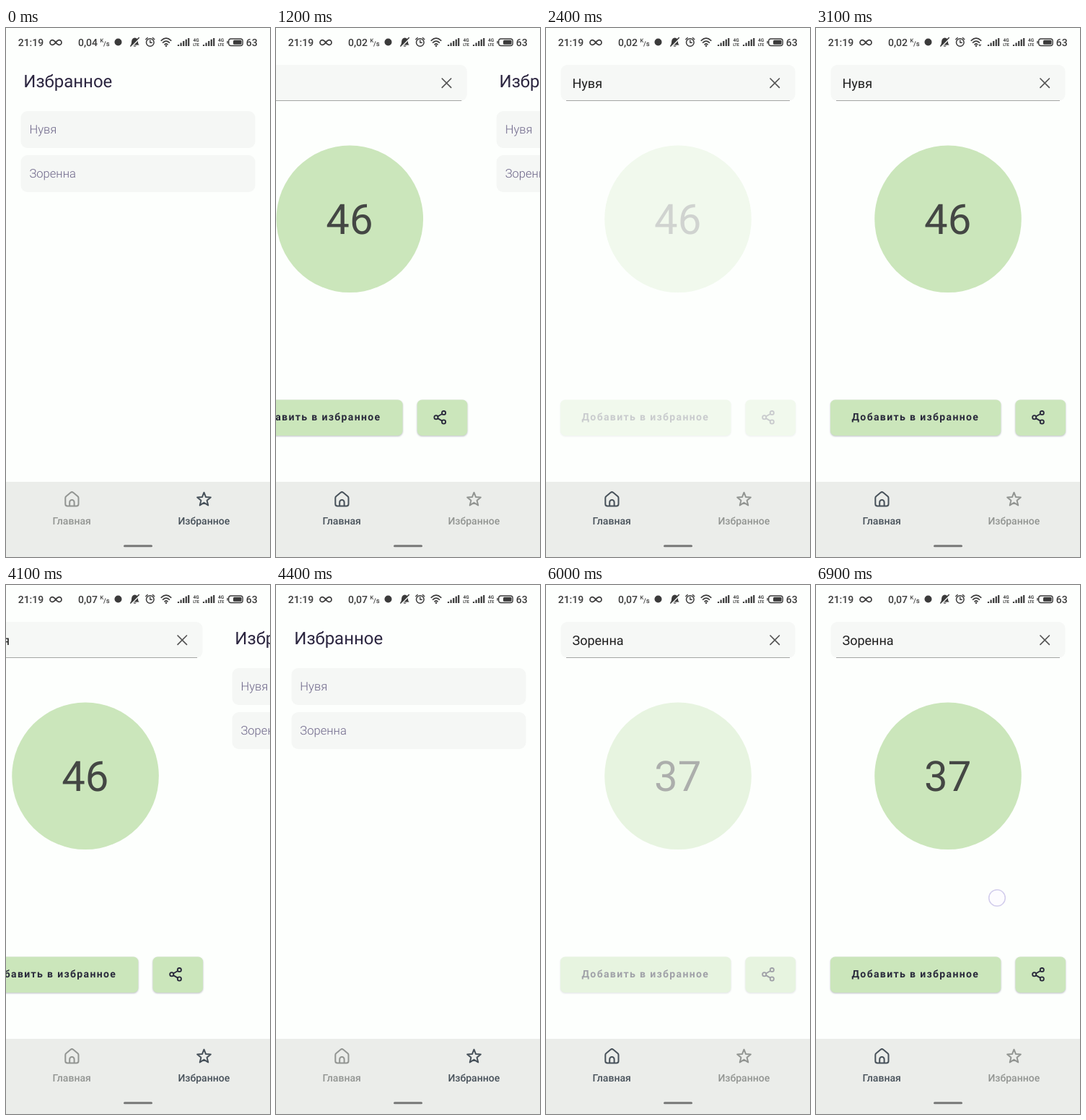
Recreate the animation shown at these times as an HTML page. Size 366 by 732 pixels, loop 7000 ms.

```html
<!DOCTYPE html>
<html lang="ru">
<head>
<meta charset="utf-8">
<title>Избранное</title>
<style>
  html, body { margin: 0; width: 100%; height: 100%; overflow: hidden; background: #fdfffd; }
  svg { display: block; width: 100vw; height: 100vh; font-family: Roboto, sans-serif; text-rendering: geometricPrecision; }
  .line { fill: none; stroke-linecap: round; stroke-linejoin: round; }
  .status { fill: #3b3b3b; font-size: 14px; font-weight: 500; }
  .status .line { fill: none; stroke: #3b3b3b; }
  .title { font-size: 24px; fill: #2c2640; }
  .item { font-size: 16.6px; font-weight: 300; fill: #6d6689; }
  .button { fill: #cbe6bb; filter: drop-shadow(0 1.3px 1px rgba(40, 40, 70, .3)); }
  .tab { fill: #929592; stroke: #929592; font-size: 14px; font-weight: 500; text-anchor: middle; }
  .tab text { stroke: none; }
  .tab .line { fill: none; stroke-width: 2; }
  .tab.on { fill: #47515a; stroke: #47515a; }
</style>
</head>
<body>
<svg viewBox="0 0 366 732">
  <defs>
    <g id="bars">
      <path d="M1 25v-2M4.6 25v-4.5M8.2 25v-7M11.8 25v-9.3M15.2 25v-11" stroke="#3b3b3b" stroke-width="2.2"/>
    </g>
    <g id="lte" font-size="6.4" font-weight="700" text-anchor="middle">
      <text y="18.6">4G</text>
      <text y="25" font-size="5.4">LTE</text>
    </g>
  </defs>
  <rect width="366" height="732" fill="#fdfffd"/>

  <g id="favourites">
    <text class="title" x="24.3" y="82">Избранное</text>
    <rect x="20.5" y="115" width="325" height="51" rx="9" fill="#f5f7f5"/>
    <rect x="20.5" y="176" width="325" height="51" rx="9" fill="#f5f7f5"/>
    <text class="item" x="32.4" y="146">Нувя</text>
    <text class="item" x="32.4" y="207">Зоренна</text>
  </g>

  <g id="home">
    <rect x="20.5" y="51" width="325" height="50" rx="9" fill="#f6f8f6"/>
    <path d="M28 100.5H338" stroke="#a5a6a5"/>
    <text id="name" x="36.5" y="82.5" font-size="18" fill="#1e1e1e"></text>
    <path class="line" d="M311 70l12.4 12.4M323.4 70L311 82.4" stroke="#555" stroke-width="1.7"/>
    <g id="result">
      <circle cx="183" cy="264.3" r="101.8" fill="#cbe6bb"/>
      <text id="score" x="182.7" y="284.5" font-size="58" fill="#444744" text-anchor="middle"></text>
      <rect class="button" x="20" y="514.5" width="236.3" height="49.5" rx="6.5"/>
      <rect class="button" x="276.5" y="514.5" width="69.5" height="49.5" rx="6.5"/>
      <text x="49.5" y="542.7" font-size="14" font-weight="700" letter-spacing="1.37" fill="#29293b">Добавить в избранное</text>
      <g class="line" stroke="#29293b" stroke-width="1.8">
        <circle cx="302.7" cy="538.8" r="2.6"/>
        <circle cx="313.3" cy="532.6" r="2.6"/>
        <circle cx="313.3" cy="545" r="2.6"/>
        <path d="M305 537.5l6-3.5M305 540.1l6 3.5"/>
      </g>
    </g>
  </g>

  <rect y="628" width="366" height="104" fill="#ebedea"/>
  <g class="tab" id="homeTab">
    <path class="line" d="M82.3 650.3q0-1.4 1.1-2.3l6.3-5.2q1.7-1.3 3.4 0l6.3 5.2q1.1.9 1.1 2.3v8.4q0 2.8-2.8 2.8H85.1q-2.8 0-2.8-2.800zM88.200 661.500v-5.300a3.200 3.200 0 0 1 6.400 0v5.300"/>
    <text x="91.200" y="686.500">Главная</text>
  </g>
  <g class="tab" id="starTab">
    <path class="line" id="star"/>
    <text x="274.300" y="686.500">Избранное</text>
  </g>
  <rect x="163" y="715.200" width="40" height="3" rx="1.500" fill="#777877"/>

  <g class="status">
    <text x="16.700" y="24.500">21:19</text>
    <path class="line" d="M69 20c-2-2.500-3-3.400-4.600-3.400a3.400 3.400 0 0 0 0 6.800c1.600 0 2.600-.9 4.600-3.400s3-3.400 4.600-3.400a3.400 3.400 0 0 1 0 6.800c-1.600 0-2.600-.9-4.600-3.400z" stroke-width="1.700"/>
    <text id="speed" x="100" y="24.500"></text>
    <text x="130.500" y="19.500" font-size="7.500">K</text>
    <text x="135" y="24.500" font-size="9.500">/s</text>
    <circle cx="155.500" cy="19.500" r="5"/>
    <path d="M172.500 23.500c1.800-1.300 1.400-3 1.600-5 .3-2.900 1.900-4.600 4.400-4.900 2.900.2 4.400 2 4.500 4.900 0 2.300.2 3.800 1.800 5zM176 24.500h5q-2.500 2.500-5 0z"/>
    <path d="M173.300 26.500L186 13.900" stroke="#fdfffd" stroke-width="1.500"/>
    <path class="line" d="M172.800 25L184.300 13.500" stroke-width="1.600"/>
    <circle class="line" cx="199.800" cy="20" r="5.300" stroke-width="1.500"/>
    <path class="line" d="M199.800 17v3.200h2.500M193.800 15.800l2.400-2.200M205.800 15.800l-2.400-2.200" stroke-width="1.400"/>
    <path class="line" d="M215.200 17.300q6.800-6.200 13.600 0M217.600 20.200q4.400-4 8.800 0M219.900 22.800q2.100-1.800 4.200 0" stroke-width="1.600"/>
    <circle cx="222" cy="24.700" r="1.200"/>
    <path id="traffic" d="M224.700 22.500h5l-2.500 3.500z" stroke="#fdfffd" stroke-width=".6"/>
    <use href="#bars" x="238"/>
    <use href="#lte" x="263.500"/>
    <use href="#bars" x="273"/>
    <use href="#lte" x="298"/>
    <rect class="line" x="308.700" y="15" width="19.500" height="9.500" rx="3.200" stroke-width="1.400"/>
    <rect x="315" y="16.800" width="11.600" height="6" rx="1.500"/>
    <path class="line" d="M307 18.500v2.500" stroke-width="1.400"/>
    <text x="332.700" y="24.500">63</text>
  </g>
  <circle id="touch" cx="251" cy="433" r="11.300" fill="#fdfcff" stroke="#d2cdec" stroke-width="1.500"/>
</svg>

<script>
const LOOP = 7000, STEP = 100, WIDTH = 366;
const SLIDE = 460, FADE = 500;
const el = id => document.getElementById(id);
const between = (t, from, to) => t >= from && t < to;
const progress = (t, start, duration) => Math.min(1, Math.max(0, (t - start) / duration));
const slide = (t, start) => 1 - (1 - progress(t, start, SLIDE)) ** 5;
const show = (id, visible) => el(id).setAttribute("visibility", visible ? "visible" : "hidden");
const moveX = (id, x) => el(id).setAttribute("transform", `translate(${x.toFixed(2)} 0)`);

const starPoints = Array.from({ length: 10 }, (_, i) => {
  const angle = i * Math.PI / 5 - Math.PI / 2, radius = i % 2 ? 4.3 : 9.8;
  return [274.5 + radius * Math.cos(angle), 652.5 + radius * Math.sin(angle)].map(v => v.toFixed(2));
});
el("star").setAttribute("d", `M${starPoints.join("L")}Z`);

function draw(time) {
  const t = Math.floor(time % LOOP / STEP) * STEP;

  // 0: favourites fill the screen, 1: home does.
  const home = slide(t, 1080) - slide(t, 4080) + slide(t, 4650);
  moveX("favourites", home * WIDTH);
  moveX("home", (home - 1) * WIDTH);

  const homeSelected = between(t, 1100, 4100) || t >= 4700;
  el("homeTab").classList.toggle("on", homeSelected);
  el("starTab").classList.toggle("on", !homeSelected);

  const second = t >= 4700;
  el("name").textContent = second ? "Зоренна" : "Нувя";
  el("score").textContent = second ? "37" : "46";
  const fadeStart = second ? 5780 : 2280;
  el("result").setAttribute("opacity", t < fadeStart ? 1 : progress(t, fadeStart, FADE));

  el("speed").textContent = t < 1100 ? "0,04" : t < 4100 ? "0,02" : "0,07";
  show("traffic", between(t, 100, 1100) || between(t, 3100, 4100));
  show("touch", t >= 6900);
}

const start = performance.now();
function tick() {
  draw(performance.now() - start);
  requestAnimationFrame(tick);
}
tick();
</script>
</body>
</html>
```
